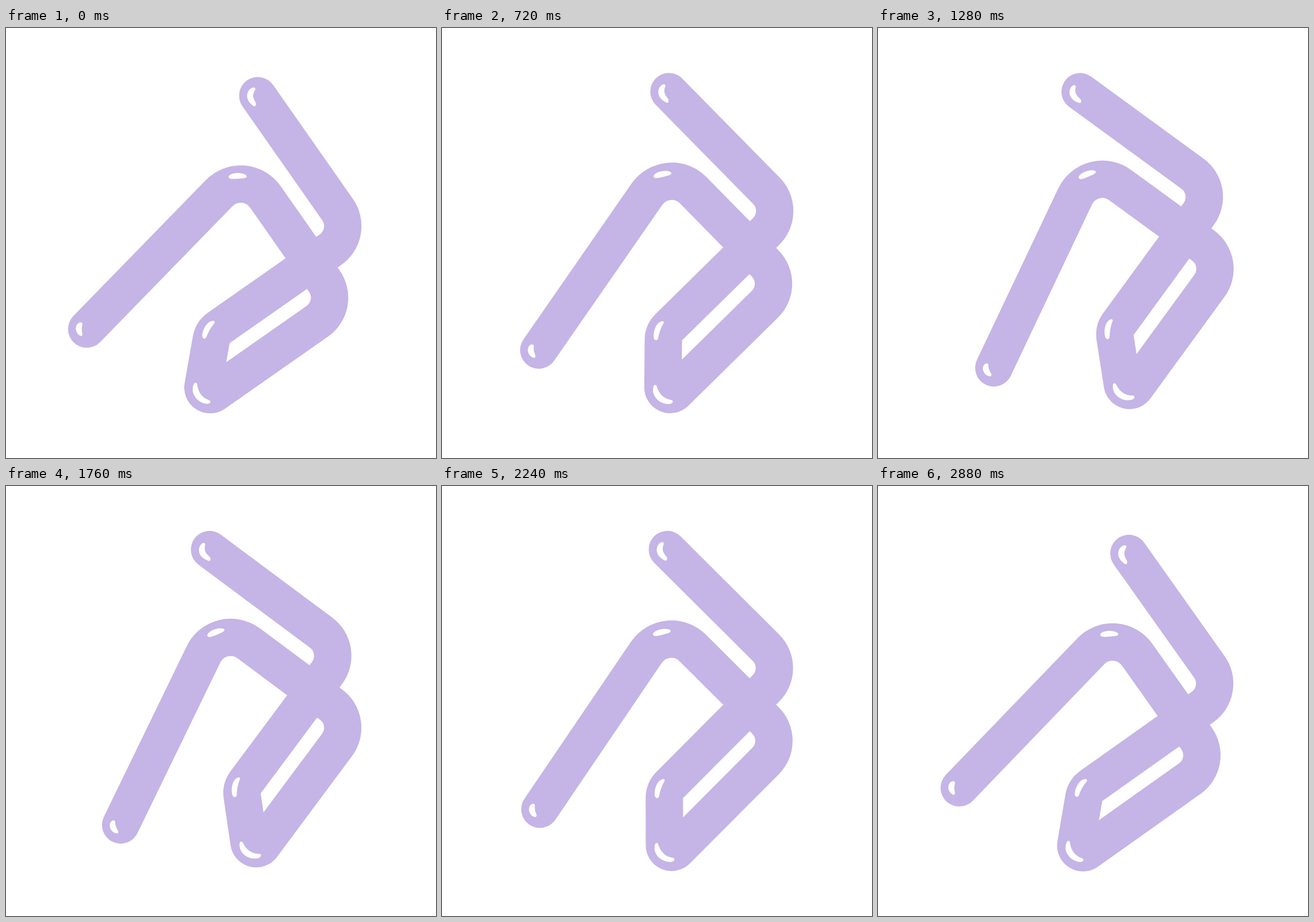
Recreate the animation shown at these times as an HTML page with a canvas. Size 748 by 748 pixels, loop 2.96 s.

```html
<!DOCTYPE html>
<html lang="en">
<head>
<meta charset="utf-8">
<title>Swinging tube</title>
<style>
html, body { margin: 0; width: 100%; height: 100%; overflow: hidden; background: #fff; }
canvas { display: block; }
</style>
</head>
<body>
<canvas width="748" height="748"></canvas>
<script>
const ctx = document.querySelector('canvas').getContext('2d');
const LOOP = 2960, STEP = 80, SWING = 1500, LEAD = 5, MAX_ANGLE = 10;

// Bends of the tube: corner x, corner y, centre-line radius
const bends = [
  [599, 317, 50],
  [386.5, 529.5, 32],
  [386.5, 655, 12.5],
  [598, 443.5, 50],
  [391.4, 236.9, 52.5]
];
const tube = new Path2D();
tube.moveTo(392.5, 110.5);
bends.forEach(([x, y, r], i) => {
  const [nx, ny] = bends[i + 1] || [170, 562];
  tube.arcTo(x, y, nx, ny, r);
});
tube.lineTo(170, 562);

const shine = new Path2D(`
  M384 97.6 Q387 98 386 102 C382 111 386 117 391 123 Q393 126 391.5 129 Q389.5 131 386 128.5 C378 124 374 118 374 111 C374 104 379 97.5 384 97.6Z
  M158.5 552.3 Q161.5 552.5 161.3 556 C160.5 562 162 567 164 571 Q165 575.5 161.5 575.7 C155 574 151 568 151 562 C151 557 154 552 158.5 552.3Z
  M367 258 C368 252 380 248 390 248.5 Q398 249 398 253 Q397 255.5 390 257 C383 259 376 261 371 261 Q367 260.5 367 258Z
  M383.5 510 Q387.5 509 387 513 C382 521 379 531 377.5 539 Q376.5 543.5 373 543 Q369.5 542 369.5 535 C370 523 375 512 383.5 510Z
  M372 621 Q375.5 620.5 376 624 C380 637 389 645 400 646.5 Q404 647 404 650 Q403 653.5 397 654 C382 654 369 643 369.3 629 Q369.5 622 372 621Z
`);

// Angle in degrees: eased swing one way, then back
function angleAt(t) {
  const phase = t / SWING;
  const x = phase < 1 ? phase : 2 - phase;
  return MAX_ANGLE * (1 - 2 * x * x * (3 - 2 * x));
}

function draw(now) {
  const t = Math.floor(now % LOOP / STEP) * STEP + LEAD;
  ctx.resetTransform();
  ctx.fillStyle = '#fff';
  ctx.fillRect(0, 0, 748, 748);
  ctx.translate(374, 374);
  ctx.rotate(angleAt(t) * Math.PI / 180);
  ctx.translate(-374, -374);
  ctx.lineWidth = 65;
  ctx.lineCap = ctx.lineJoin = 'round';
  ctx.strokeStyle = '#c5b4e6';
  ctx.stroke(tube);
  ctx.fill(shine);
}

const start = performance.now();
function tick() {
  draw(performance.now() - start);
  requestAnimationFrame(tick);
}
tick();
</script>
</body>
</html>
```
